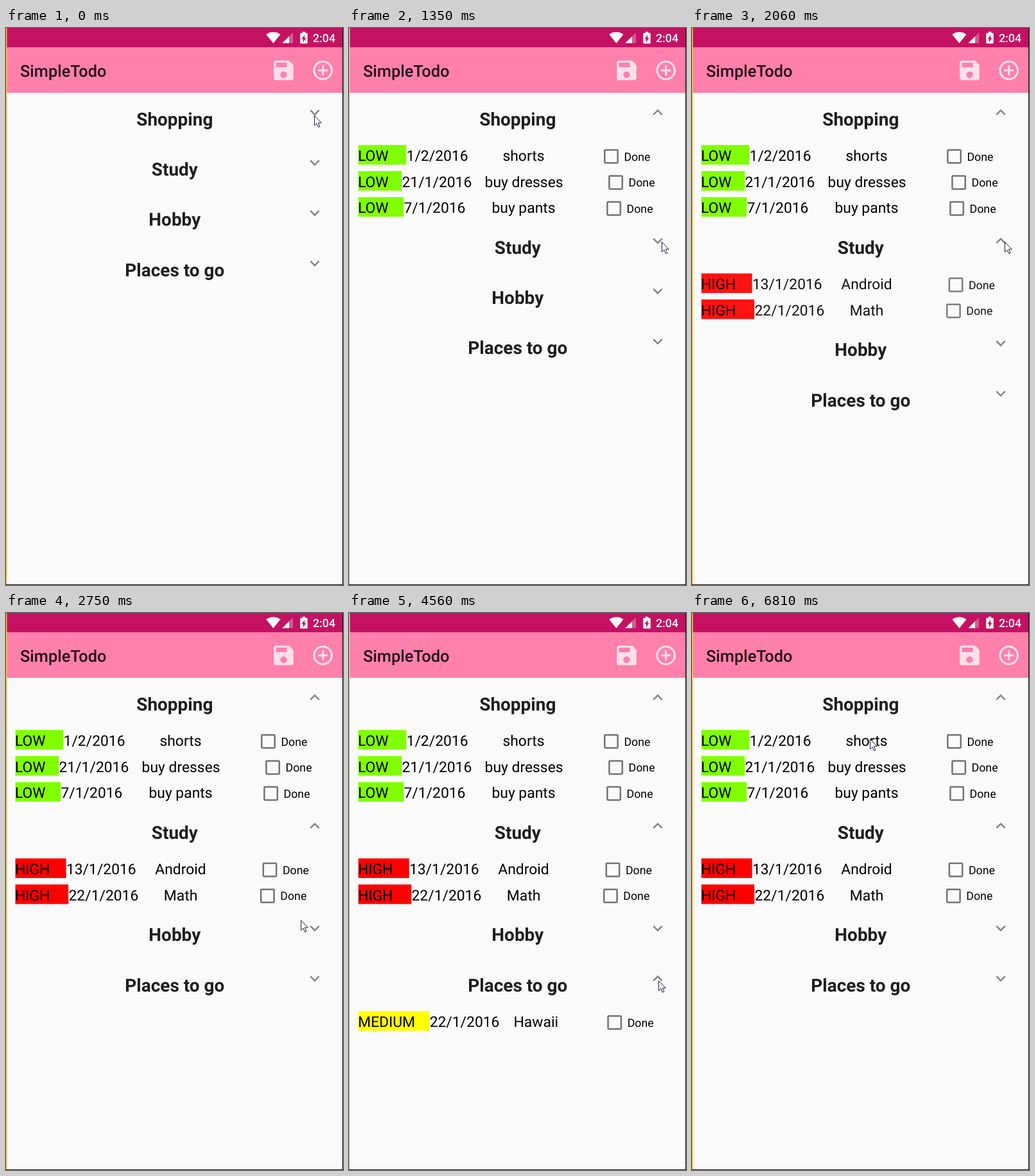
Write an HTML page that moves like this. It is 525x868 px and loops after 8 s.

```html
<!DOCTYPE html>
<html lang="en">
<head>
<meta charset="utf-8">
<title>SimpleTodo</title>
<style>
html, body { margin: 0; width: 100%; height: 100%; overflow: hidden; background: #fafafa; }
svg { display: block; width: 525px; height: 868px; font-family: Roboto, sans-serif; text-rendering: geometricPrecision; }
.clock { font-size: 17.8px; font-weight: 500; fill: #fff; }
.title { font-size: 25.4px; font-weight: 500; fill: #240f17; }
.head { font-size: 27.95px; font-weight: 700; fill: #1f1f1f; text-anchor: middle; }
.cell { font-size: 22.87px; }
.task { text-anchor: middle; }
.done { font-size: 17.8px; }
.box { fill: none; stroke: #737373; stroke-width: 2.5; }
.chevron { fill: #868686; }
.action { fill: #ffdfe9; }
</style>
</head>
<body>
<svg viewBox="0 0 525 868">
  <rect width="525" height="868" fill="#fafafa"/>
  <rect width="525" height="30" fill="#c51162"/>
  <rect y="30" width="525" height="71" fill="#ff80ab"/>

  <g fill="#fff">
    <path transform="translate(405 3.4) scale(.95)" d="M12 21.5L23.64 7c-.45-.34-4.93-4-11.64-4S.81 6.66.36 7z"/>
    <path d="M430.5 23.5L447 7V23.5Z" opacity=".3"/>
    <path d="M430.5 23.5L441 13V23.5Z"/>
    <path transform="translate(450.2 4) scale(1.15 .92)" d="M15.67 4H14V2h-4v2H8.33C7.6 4 7 4.6 7 5.33v15.33C7 21.4 7.6 22 8.33 22h7.33c.74 0 1.34-.6 1.34-1.33V5.33C17 4.6 16.4 4 15.67 4zM11 20v-5.5H9L13 7v5.5h2L11 20z"/>
  </g>
  <text class="clock" x="478" y="22">2:04</text>

  <text class="title" x="22" y="75.5">SimpleTodo</text>
  <path class="action" transform="translate(432.5 66) scale(1.7) translate(-12 -12)" d="M17 3H5c-1.11 0-2 .9-2 2v14c0 1.1.89 2 2 2h14c1.1 0 2-.9 2-2V7l-4-4zm-5 16c-1.66 0-3-1.34-3-3s1.34-3 3-3 3 1.34 3 3-1.34 3-3 3zm3-10H5V5h10v4z"/>
  <path class="action" transform="translate(493.7 66) scale(1.53) translate(-12 -12)" d="M13 7h-2v4H7v2h4v4h2v-4h4v-2h-4V7zm-1-5C6.48 2 2 6.48 2 12s4.48 10 10 10 10-4.48 10-10S17.52 2 12 2zm0 18c-4.41 0-8-3.59-8-8s3.59-8 8-8 8 3.59 8 8-3.59 8-8 8z"/>

  <g id="list"></g>

  <rect width="1.5" height="868" fill="#f3bd5c"/>
  <rect x="524" width="1" height="868" fill="#111"/>
  <rect y="867" width="525" height="1" fill="#111"/>
  <path id="cursor" d="M.5.5V16L4 12.7 6.5 18.6 8.9 17.6 6.4 11.8H11.2Z" fill="#fff" stroke="#1c1c30" stroke-linejoin="round"/>
</svg>
<script>
const LOOP = 8000, STEP = 135, LEAD = 20;
const TOP = 151.5, HEAD = 78.35, ROW = 40.6, LEFT = 14, CENTRE = 272;
const SLIDE = 250, FADE = 120, TURN = 200;
const COLORS = { LOW: '#80ff00', HIGH: '#ff0000', MEDIUM: '#ffff00' };

// slack is the free space each column of a row receives
const groups = [
  { name: 'Shopping', open: 218, wait: SLIDE, rows: [
    { level: 'LOW', date: '1/2/2016', task: 'shorts', slack: 27.7 },
    { level: 'LOW', date: '21/1/2016', task: 'buy dresses', slack: 20.6 },
    { level: 'LOW', date: '7/1/2016', task: 'buy pants', slack: 23.6 }] },
  { name: 'Study', open: 1664, wait: SLIDE, rows: [
    { level: 'HIGH', date: '13/1/2016', task: 'Android', slack: 25.2 },
    { level: 'HIGH', date: '22/1/2016', task: 'Math', slack: 28.8 }] },
  { name: 'Hobby', rows: [] },
  { name: 'Places to go', open: 3790, close: 4940, rows: [
    { level: 'MEDIUM', date: '22/1/2016', task: 'Hawaii', slack: 22.4 }] }
];

// pointer moves along quadratic curves
const home = [480, 136];
const moves = [
  { from: 680, until: 1200, via: [505, 290], to: [487, 333] },
  { from: 2250, until: 3500, via: [420, 640], to: [482, 572.5] },
  { from: 5000, until: 6130, via: [580, 360], to: [192, 159] },
  { from: 6130, until: 6700, via: [260, 225], to: [277, 196] }
];

const NS = 'http://www.w3.org/2000/svg';
function add(parent, tag, attrs = {}, text = '') {
  const el = document.createElementNS(NS, tag);
  for (const key in attrs) el.setAttribute(key, attrs[key]);
  el.textContent = text;
  return parent.appendChild(el);
}

function addRow(parent, { level, date, task, slack }, i) {
  const row = add(parent, 'g', { transform: `translate(0 ${i * ROW})` });
  const cell = (text, type = '') => add(row, 'text', { class: `cell ${type}`, x: LEFT, y: 55.5 }, text);
  const width = el => el.getComputedTextLength();

  const patch = add(row, 'rect', { x: LEFT + .5, y: 30.8, height: 30.5, fill: COLORS[level] });
  const edge = LEFT + width(cell(level)) + slack;
  patch.setAttribute('width', edge - LEFT - .5);

  const when = cell(date);
  when.setAttribute('x', edge + .3);
  const what = cell(task, 'task');
  what.setAttribute('x', Math.max(CENTRE, edge + width(when) + slack + width(what) / 2));

  const check = 436.2 - slack;
  add(row, 'rect', { class: 'box', x: check - 10.2, y: 38.4, width: 20.4, height: 20.4, rx: 1.2 });
  add(row, 'text', { class: 'done', x: check + 19.9, y: 55 }, 'Done');
}

const list = document.getElementById('list');
const cursor = document.getElementById('cursor');
for (const g of groups) {
  g.el = add(list, 'g');
  add(g.el, 'text', { class: 'head', x: 262.8 }, g.name);
  g.chevron = add(g.el, 'path', { class: 'chevron', d: 'M16.59 8.59L12 13.17 7.41 8.59 6 10l6 6 6-6z' });
  g.body = add(g.el, 'g');
  g.rows.forEach((row, i) => addRow(g.body, row, i));
}

const clamp = p => Math.min(1, Math.max(0, p));
const ease = p => (1 - Math.cos(Math.PI * clamp(p))) / 2;

function pointer(t) {
  let pos = home;
  for (const { from, until, via, to } of moves) {
    const k = ease((t - from) / (until - from));
    pos = pos.map((p, i) => (1 - k) ** 2 * p + 2 * k * (1 - k) * via[i] + k * k * to[i]);
  }
  return pos;
}

function draw(t) {
  let y = TOP;
  for (const { el, chevron, body, rows, open = Infinity, close = Infinity, wait = 0 } of groups) {
    const turn = ease((t - open) / TURN) - ease((t - close) / TURN);
    const fade = clamp((t - open - wait) / FADE) - clamp((t - close) / FADE);
    el.setAttribute('transform', `translate(0 ${y})`);
    chevron.setAttribute('transform',
      `translate(481 -19.9) rotate(${180 * turn}) scale(1.27) translate(-12 -12)`);
    body.setAttribute('opacity', fade);
    y += HEAD + rows.length * ROW * ease((t - open) / SLIDE);
  }
  cursor.setAttribute('transform', `translate(${pointer(t)})`);
}

const start = performance.now();
function frame() {
  const t = (performance.now() - start) % LOOP;
  draw(Math.floor((t + LEAD) / STEP) * STEP);
  requestAnimationFrame(frame);
}
frame();
</script>
</body>
</html>
```
